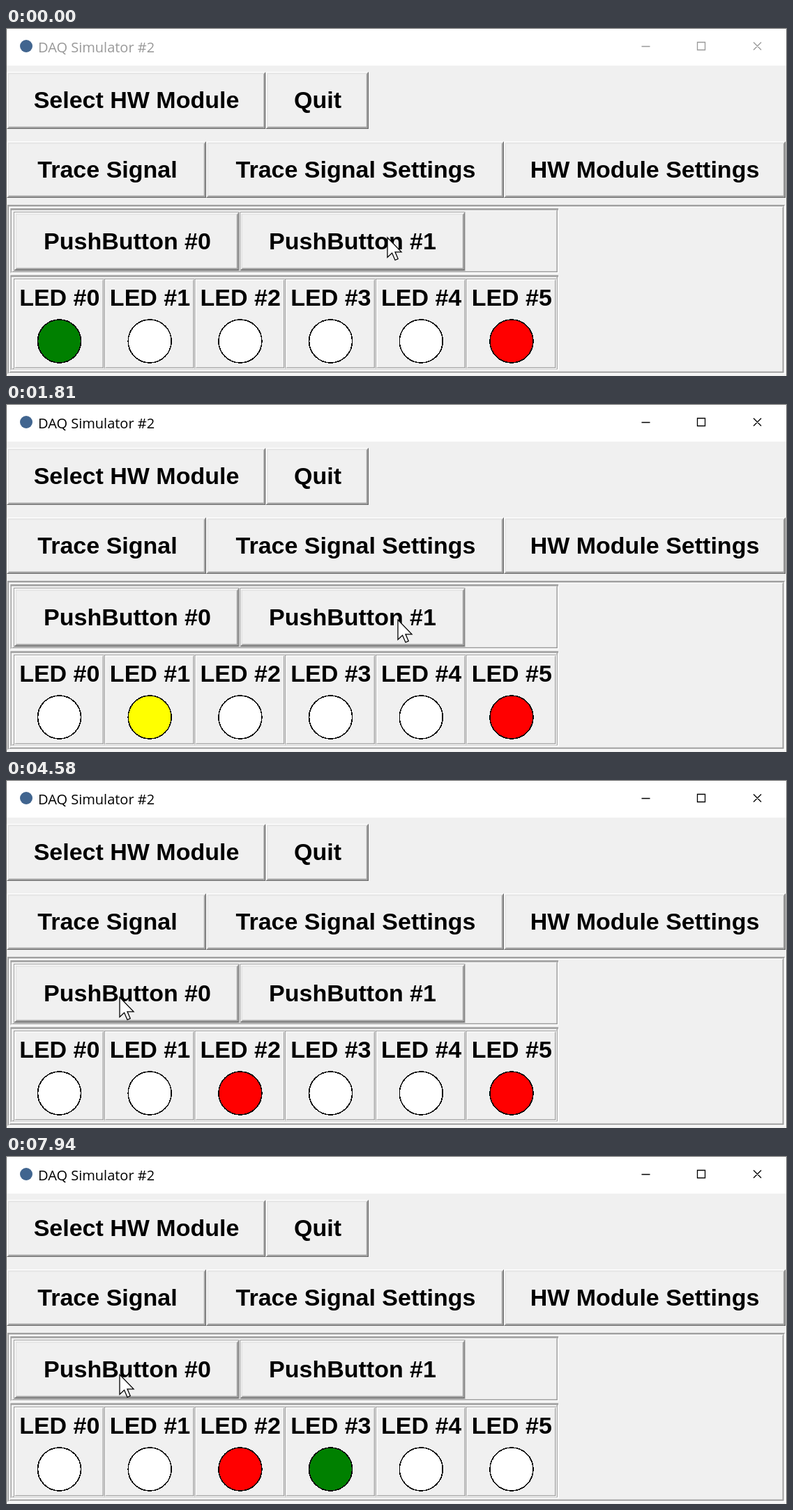
An HTML page for the animation above (8 s loop, 1120 by 500 pixels).

```html
<!DOCTYPE html>
<html lang="en">
<head>
<meta charset="utf-8">
<title>DAQ Simulator</title>
<style>
  html, body { margin: 0; width: 100%; height: 100%; overflow: hidden; background: #f0f0f0; }
  svg { display: block; width: 100vw; height: 100vh; }
  .label { font: bold 34px "Liberation Sans", Arial, sans-serif; text-anchor: middle; }
  .title { font: 20px "Open Sans", "Noto Sans", sans-serif; }
</style>
</head>
<body>
<svg id="stage" viewBox="0 0 1120 500"></svg>
<script>
const LOOP = 8000;
const GRAY = '#a0a0a0', DARK = '#696969', LIGHT = '#e3e3e3', WHITE = '#ffffff';
const stage = document.getElementById('stage');

function add(tag, attrs, parent = stage) {
  const node = document.createElementNS('http://www.w3.org/2000/svg', tag);
  set(node, attrs);
  return parent.appendChild(node);
}

function set(node, attrs) {
  for (const key in attrs) node.setAttribute(key, attrs[key]);
}

function label(text, x, y, parent) {
  const node = add('text', { x, y, class: 'label' }, parent);
  node.textContent = text;
  return node;
}

// One mitred bevel ring: top-left edge and bottom-right edge.
function bevel(x, y, w, h, topLeft, bottomRight, t, parent) {
  const r = x + w, b = y + h;
  add('path', { fill: topLeft,
    d: `M${x} ${b}V${y}H${r}l${-t} ${t}H${x + t}V${b - t}Z` }, parent);
  add('path', { fill: bottomRight,
    d: `M${r} ${y}V${b}H${x}l${t} ${-t}H${r - t}V${y + t}Z` }, parent);
}

function groove(x, y, w, h, t = 1.5) {
  bevel(x, y, w, h, GRAY, WHITE, t);
  bevel(x + t, y + t, w - 2 * t, h - 2 * t, WHITE, GRAY, t);
}

function button(text, x, y, w, h, cx, baseline) {
  const t = 1.6;
  const face = (outer, inner, shift) => {
    const g = add('g', {});
    bevel(x, y, w, h, ...outer, t, g);
    bevel(x + t, y + t, w - 2 * t, h - 2 * t, ...inner, t, g);
    label(text, cx + shift, baseline + shift, g);
    return g;
  };
  const up = face([WHITE, DARK], [LIGHT, GRAY], 0);
  const down = face([DARK, WHITE], [GRAY, LIGHT], 1.5);
  return pressed => {
    set(up, { visibility: pressed ? 'hidden' : 'visible' });
    set(down, { visibility: pressed ? 'visible' : 'hidden' });
  };
}

// Window and title bar
add('rect', { width: 1120, height: 500, fill: '#f0f0f0' });
add('rect', { width: 1120, height: 54, fill: WHITE });
add('circle', { cx: 29, cy: 26, r: 9, fill: '#41658f' });
const title = add('text', { x: 46, y: 35, class: 'title' });
title.textContent = 'DAQ Simulator #2';
const controls = add('path', { fill: 'none', 'stroke-width': 1.3,
  d: 'M911.5 26.5H923.5M991.5 20.5H1002.5V31.5H991.5ZM1072 20.5L1083 31.5M1083 20.5L1072 31.5' });

// Toolbars
[
  ['Select HW Module', 1, 63, 371.5, 82, 187, 115],
  ['Quit', 372.5, 63, 147.5, 82, 447, 115],
  ['Trace Signal', 1, 163, 286, 81, 145.5, 215],
  ['Trace Signal Settings', 287, 163, 427, 81, 501.5, 215],
  ['HW Module Settings', 714, 163, 404, 81, 916, 215]
].forEach(spec => button(...spec)(false));

// Panels
groove(2, 254, 1115.5, 243.5, 2);
groove(6.5, 259.5, 786, 93);
groove(6.5, 355.5, 786, 136.5);
add('path', { d: 'M2 255.3H1116M6.5 260.5H792M6.5 356.5H792', stroke: GRAY, 'stroke-width': 2.4 });

const press0 = button('PushButton #0', 12, 265, 322, 83, 174, 318);
const press1 = button('PushButton #1', 336, 265, 322, 83, 497, 318);
bevel(11, 264, 323.5, 85, GRAY, GRAY, 1);
bevel(335.5, 264, 323, 85, GRAY, GRAY, 1);

const leds = Array.from({ length: 6 }, (_, i) => {
  const x = 129.7 * i;
  groove(11 + x, 360, 130.2, 130, 1.3);
  label('LED #' + i, 76.8 + x, 399);
  return add('circle', { cx: 76.5 + x, cy: 450, r: 31, stroke: '#000',
    'stroke-width': 1.6, 'shape-rendering': 'crispEdges' });
});

// Window edge
add('path', { d: 'M0.5 500V0.5H1119.5V500', fill: 'none', stroke: '#666' });

// Pointer
const pointer = add('g', {});
const ring = add('circle', { r: 5, fill: 'none', stroke: '#4a3830', 'stroke-width': 1.3 }, pointer);
add('path', { d: 'M0 0V28.5L6.6 22.3L11 32.5L15.2 30.6L11 20.8H20Z',
  fill: WHITE, stroke: '#000', 'stroke-width': 1.3 }, pointer);

const stops = [
  [0, 547, 301], [500, 551, 303], [585, 558, 308], [670, 562, 310],
  [3770, 559, 309], [4520, 166, 312], [4580, 163, 312],
  [5760, 161, 312], [5880, 163, 312], [7940, 163, 314]
];

const ledStates = [
  [0, { 0: 'green', 5: 'red' }],
  [1810, { 1: 'yellow', 5: 'red' }],
  [3770, { 2: 'red', 5: 'red' }],
  [4730, { 2: 'red', 3: 'green' }]
];

const latest = (list, t) => list.filter(item => item[0] <= t).pop();
const within = (t, from, to) => t >= from && t < to;

function pointerAt(t) {
  if (!within(t, 3770, 4520)) return latest(stops, t).slice(1);
  // The long sweep advances in eleven discrete steps.
  const p = Math.floor((t - 3770) / 750 * 11) / 11;
  const e = p * p * (3 - 2 * p);
  return [Math.round(559 - 393 * e), Math.round(309 + 3 * e)];
}

function draw(t) {
  const active = t >= 1750;
  set(title, { fill: active ? '#000' : '#999' });
  set(controls, { stroke: active ? '#000' : '#999' });
  press0(within(t, 5880, 6410));
  press1(within(t, 1750, 1810));
  const lit = latest(ledStates, t)[1];
  leds.forEach((led, i) => set(led, { fill: lit[i] || WHITE }));
  set(pointer, { transform: `translate(${pointerAt(t)})` });
  const click = within(t, 1660, 1750) || within(t, 5820, 5880);
  set(ring, { visibility: click ? 'visible' : 'hidden' });
}

function tick() {
  draw(performance.now() % LOOP);
  requestAnimationFrame(tick);
}
tick();
</script>
</body>
</html>
```
